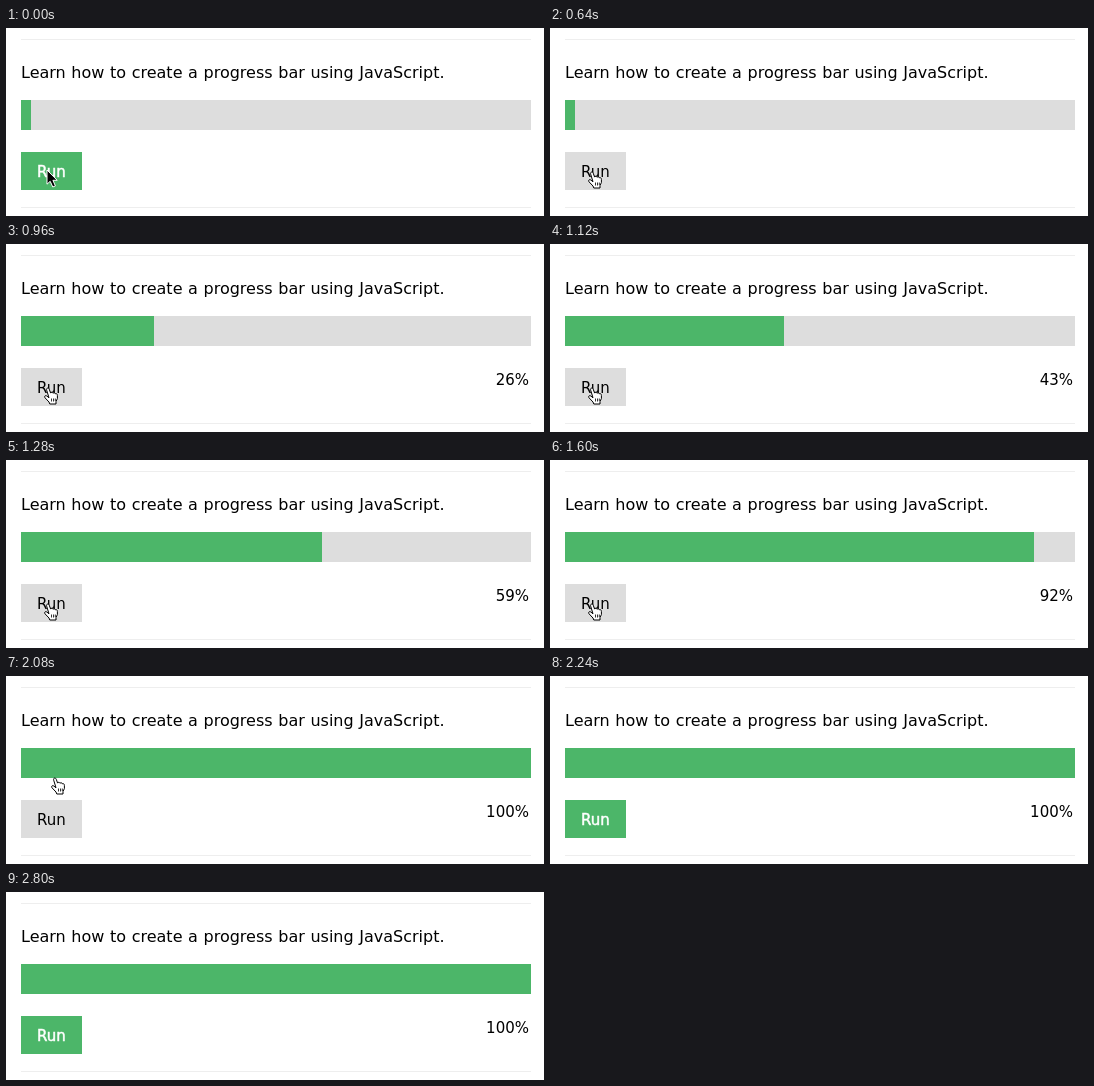
Recreate the animation shown at these times as an HTML page. Size 538 by 188 pixels, loop 2960 ms.

```html
<!DOCTYPE html>
<html lang="en">
<head>
<meta charset="utf-8">
<title>Progress bar</title>
<style>
  html, body { margin: 0; width: 100%; height: 100%; overflow: hidden; background: #fff; }
  svg { display: block; font: 15px "DejaVu Sans", sans-serif; }
  rect { shape-rendering: crispEdges; }
  .intro { font-size: 16px; word-spacing: .034em; }
  .rule { fill: #eee; }
  .track { fill: #ddd; }
  .green { fill: #4cb669; }
  #button { fill: #ddd; }
  .hover #button { fill: #4cb669; }
  .hover #run { fill: #fff; stroke: #fff; stroke-width: .5px; }
  #arrow { stroke: #fff; stroke-linejoin: round; }
  #hand { fill: #fff; stroke: #000; stroke-linejoin: round; }
</style>
</head>
<body>
<svg id="stage" width="538" height="188" viewBox="0 0 538 188">
  <rect class="rule" x="15" y="11" width="510" height="1"/>
  <rect class="rule" x="15" y="179" width="510" height="1"/>
  <text class="intro" x="15" y="50">Learn how to create a progress bar using JavaScript.</text>
  <rect class="track" x="15" y="72" width="510" height="30"/>
  <rect class="green" id="bar" x="15" y="72" height="30"/>
  <rect id="button" x="15" y="124" width="61" height="38"/>
  <text id="run" x="31" y="149">Run</text>
  <text id="label" x="523" y="141" text-anchor="end"></text>
  <path id="arrow" d="M0 0V14.2L3.2 11.3L5.8 17L8.4 15.9L5.9 10.3H10.2Z"/>
  <g id="hand">
    <path d="M6 10.8L3.7 3.2C3 .8 5.6 .2 6.3 2.4L7.6 6.1C8.2 4.9 9.6 5.1 10 6.3C10.7 5.3 12 5.6 12.3 6.8C13.5 6.2 14.4 7 14.4 8.5V11.5L13 14.5V17H6.8L6 15L2 10.8C.8 9.2 2.6 8 3.8 9Z"/>
    <path d="M8.5 11.5V14.5M10.5 11.5V14.5M12.3 11.5V14" stroke-width=".8"/>
  </g>
</svg>
<script>
const LOOP = 2960, STEP = 80;
const PRESS = 640, START = 800, LEAVE = 2080, RELEASE = 2160, GONE = 2240;
const el = id => document.getElementById(id);
const [stage, bar, label, arrow, hand] = ["stage", "bar", "label", "arrow", "hand"].map(el);

function place(node, visible, x, y) {
  node.setAttribute("visibility", visible ? "visible" : "hidden");
  node.setAttribute("transform", `translate(${x} ${y})`);
}

function draw(time) {
  const t = Math.floor((time % LOOP) / STEP) * STEP;
  const running = t >= START;
  const percent = running ? Math.min(100, Math.round(9.5 + 8.25 * (t - START) / STEP)) : 2;

  bar.setAttribute("width", Math.round(5.1 * percent));
  label.textContent = running ? percent + "%" : "";
  stage.classList.toggle("hover", t < PRESS || t >= RELEASE);

  // The pointer flicks up and off the stage once the bar is full.
  const flicked = t >= RELEASE;
  place(arrow, t < PRESS || (flicked && t < GONE), flicked ? 58 : 41, flicked ? 1 : 142);
  const left = t >= LEAVE;
  place(hand, t >= PRESS && t < RELEASE, left ? 44 : 37, left ? 101 : 143);
}

const begin = performance.now();
function tick() {
  draw(performance.now() - begin);
  requestAnimationFrame(tick);
}
tick();
</script>
</body>
</html>
```
